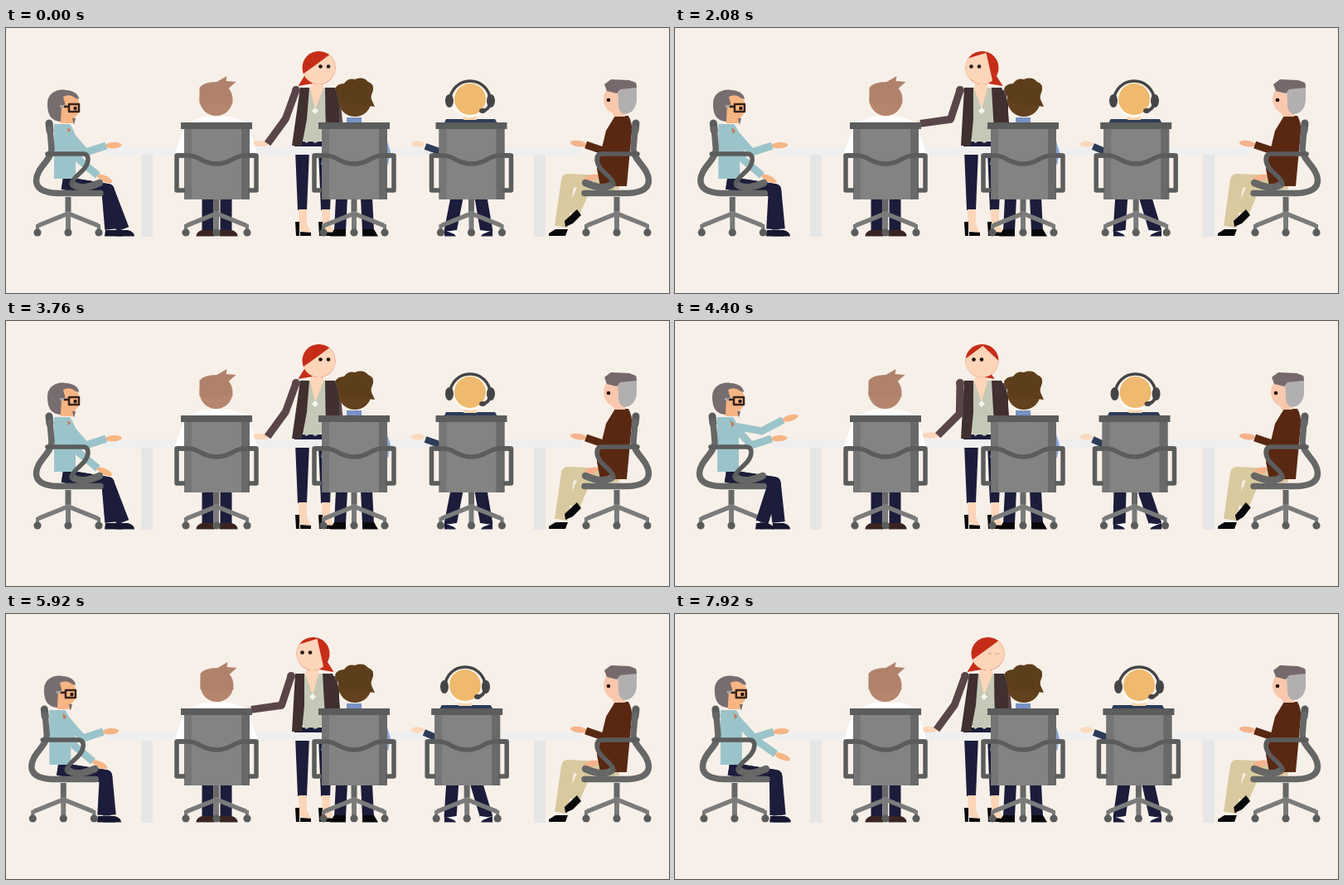
Recreate the animation shown at these times as an HTML page with a canvas. Size 800x320 px, loop 8000 ms.

```html
<!DOCTYPE html>
<html lang="en">
<head>
<meta charset="utf-8">
<title>Meeting</title>
<style>
html, body { margin: 0; width: 100%; height: 100%; overflow: hidden; background: #f7f0e9; }
canvas { display: block; }
</style>
</head>
<body>
<canvas id="stage" width="800" height="320"></canvas>
<script>
const ctx = document.getElementById('stage').getContext('2d');
const LOOP = 8000, CYCLE = 3840, STEP = 80, RAD = Math.PI / 180;
const NAVY = '#1c1d3b', BLACK = '#08080a', FRAME = '#666766', DARK = '#5b5c5c', BASE = '#7a7b7a';
const SKIN = '#fdd5b8', PEACH = '#f7b583', TEAL = '#9bc4ca', WOOL = '#592812', DENIM = '#2d3c58';

// Drawing helpers
function shape(color, d) { ctx.fillStyle = color; ctx.fill(new Path2D(d)); }
function rect(color, x, y, w, h) { ctx.fillStyle = color; ctx.fillRect(x, y, w, h); }
function oval(color, x, y, rx, ry = rx, degrees = 0) {
  ctx.fillStyle = color;
  ctx.beginPath();
  ctx.ellipse(x, y, rx, ry, degrees * RAD, 0, Math.PI * 2);
  ctx.fill();
}
function stroke(color, width, d, cap = 'butt') {
  Object.assign(ctx, { strokeStyle: color, lineWidth: width, lineCap: cap, lineJoin: 'round' });
  ctx.stroke(new Path2D(d));
}
function at(x, y, draw, flip = 1) {
  ctx.save();
  ctx.translate(x, y);
  ctx.scale(flip, 1);
  draw();
  ctx.restore();
}
function bothSides(x, draw) { for (const side of [-1, 1]) at(x, 0, draw, side); }

// Two bones and a hand, posed by the angles of the bones
function arm(sleeve, skin, x, y, upper, fore, upperAngle, foreAngle, handAngle = foreAngle) {
  const elbowX = x + upper * Math.cos(upperAngle * RAD), elbowY = y + upper * Math.sin(upperAngle * RAD);
  const wristX = elbowX + fore * Math.cos(foreAngle * RAD), wristY = elbowY + fore * Math.sin(foreAngle * RAD);
  oval(skin, wristX + 9 * Math.cos(handAngle * RAD), wristY + 9 * Math.sin(handAngle * RAD), 10, 3.7, handAngle);
  stroke(sleeve, 9, `M${x} ${y}L${elbowX} ${elbowY}L${wristX} ${wristY}`);
}

// Motion helpers
function ease(t, from, to) {
  const k = Math.min(1, Math.max(0, (t - from) / (to - from)));
  return k * k * (3 - 2 * k);
}
const hold = (t, from, full, release, end) => ease(t, from, full) - ease(t, release, end);

// Chairs
function wheels() {
  rect(FRAME, -3.5, 204, 7, 18);
  stroke(BASE, 5.5, 'M-36 238.5L0 224L36 238.5');
  stroke(BASE, 6, 'M0 221V244');
  for (const x of [-37, 0, 37]) {
    rect(BASE, x - 2, 237, 4, 8);
    oval(DARK, x, 247, 4.6);
  }
}
function sideChair() {
  stroke(DARK, 9, 'M52 115L53 124', 'round');
  stroke(FRAME, 7.5, 'M53 122L55 146C55 160 37 168 36.5 184C36.5 196 49 199 62 199.5H114', 'round');
  stroke(FRAME, 8.5, 'M81 189C90 195 101 192 113 187', 'round');
  stroke(DARK, 5.5, 'M50 152H93Q99 152 99 159C98 173 81 178 79 188', 'round');
}
function backChair(x) {
  at(x, 0, () => {
    wheels();
    rect('#828382', -39, 121, 79, 86);
    rect('#747574', -39, 121, 9, 86);
    rect('#686968', 30, 121, 10, 86);
    rect(DARK, -43, 114, 86, 8);
  });
  bothSides(x, () => {
    stroke(DARK, 5.5, 'M38 154H48V196H38');
    stroke(DARK, 5.5, 'M47 154H34C20 154 18 164 0 164');
  });
}

// People
function womanHead(turn, blink) {
  const RED = '#c62d18', right = Math.max(turn, 0);
  const eyes = -10 + 3 * turn + 9 * right;
  at(370.5 + 7 * right, 48, () => {
    at(6 - 6 * Math.abs(turn) - 16 * turn, 11, () => shape(RED, 'M-1 -5L9 11L-9 8Z'), turn > 0 ? -1 : 1);
    oval(RED, 0, 0, 20);
    ctx.fillStyle = SKIN;
    ctx.beginPath();
    ctx.moveTo(1 - 4 * turn, -18 + 14 * right);
    ctx.arc(0, 0, 20, -51 * turn * RAD, (187 - 28 * turn) * RAD);
    ctx.fill();
    for (const x of [eyes, eyes + 9.5]) {
      if (blink) stroke('#c9a08a', 1, `M${x - 2.5} 0H${x + 2.5}`);
      else oval('#17110f', x, -1.5, 2.3);
    }
  });
}

function woman(t) {
  const SLEEVE = '#5a4649', JACKET = '#40302f';
  const lean = 1 - hold(t, 240, 560, 2600, 3040);
  const turn = lean - hold(t, 560, 780, 2600, 3040);
  const reach = hold(t, 1520, 1960, 2200, 2600);
  const s = 6 * lean, half = s / 2;

  rect(NAVY, 348, 137, 36, 12);
  for (const x of [0, 28]) {
    at(x, 0, () => {
      shape(NAVY, 'M349 148H366L363 220H352Z');
      shape(SKIN, 'M353 219H363V236L368 248L354 244Z');
      shape(BLACK, 'M349 234H354V251H350ZM355 246L368 247V251H355Z');
    });
  }

  stroke(SLEEVE, 9, `M${395 + half} 75L${399 + half} 118`);
  shape('#c5c8b7', `M${358 + s} 72H${386 + half}L383 134L373 139L368 136L362 139L357 133Z`);
  shape(SKIN, `M${363 + s} 64H${377 + s}V73L${370 + half} 98L${361 + s} 73Z`);
  shape(JACKET, `M${349 + s} 72H${360 + s}L${360 + half} 110L357 142H345Z`);
  shape(JACKET, `M${382 + half} 72H${394 + half}L402 90V143H386Z`);
  at(370 + half, 100, () => shape('#f5f4ed', 'M0 -4L4 0L0 4L-4 0Z'));
  arm(SLEEVE, SKIN, 344 + s, 75, 37, 37,
    91 + 19 * lean + 17 * reach, 135 - 9 * lean + 37 * reach, 180);
  oval(SLEEVE, 344 + s, 75, 5);
  womanHead(turn, t >= 160 && t <= 320);
}

function leftMan(t) {
  const lean = hold(t, 0, 520, 1840, 2720);
  const step = hold(t, 0, 280, 2080, 2720);
  const tuck = hold(t, 240, 560, 1480, 2000);
  const lift = hold(t, 0, 560, 1480, 1960);
  const wave = hold(t, 160, 760, 1480, 1960);
  const GREY = '#776c6e', dx = -7 * lean;

  at(75 + dx, 0, wheels);
  for (const foot of [127 - 11 * lean - 11 * tuck, 141 - 16 * step]) {
    stroke(NAVY, 15.5, `M${68 + dx} 187L${123 - 3 * lean} 196L${foot} 243`);
    at(foot, 0, () => shape('#17182f', 'M-7 244H6Q14 246 14 251.5H-8Z'));
  }
  at(dx, 0, () => {
    shape(TEAL, 'M58 116H77Q83 124 84 134V182H58Z');
    shape('#c77a55', 'M74 120L78 123L79 130L76 132Z');
  });
  arm(TEAL, PEACH, 75 + dx * .6, 126, 32, 26, 49, -18, -3);
  arm(TEAL, PEACH, 78 + dx, 127, 34, 29, 72 - 62 * lift, 40 - 91 * wave, 25 - 55 * wave);

  at(-5 * lean, 0, () => {
    shape(PEACH, 'M62 99H85L82 115H66Z');
    oval(PEACH, 75, 95, 14, 16);
    shape(GREY, 'M66 113C53 112 50 103 50 91C50 78 63 73 72 75C81 75 88 80 88 86L76 82L70 84L75 91L67 94Z');
    shape(PEACH, 'M69 83Q77 79 83 84V91L72 94Z');
    shape(GREY, 'M80 109H84L82 117Z');
    rect('#aaa6a5', 65, 93, 9, 3);
    stroke('#38231a', 2.5, 'M70 95H76M76 92H88V101H76Z');
    oval('#26170f', 83.5, 97, 2.2);
  });
  at(dx, 0, sideChair);
}

function rightMan(t) {
  const PANTS = '#d9c99f', FACE = '#f9c8ae', HAND = '#f6b28b';
  const nod = -2 * hold(t, 240, 560, 560, 880);
  const tap = hold(t, 160, 500, 640, 860);

  at(-2 * hold(t, 2360, 2640, 3540, 3720), 0, () => {
    at(737, 0, wheels);
    stroke(PANTS, 16, 'M740 187L678 184L670 240');
    stroke(PANTS, 16, 'M735 188L700 187L684 224');
    shape(BLACK, 'M663 243H678L675 251H655V248Z');
    at(688, 220, () => {
      ctx.rotate(-tap * .13);
      shape(BLACK, 'M1 -1L6 6L-4 16L-13 20L-14 13Z');
    });
    oval(HAND, 706, 181, 9, 4, -15);
    shape(WOOL, 'M735 106H751Q756 114 755 126L749 191H717L713 170L724 124Z');
    arm(WOOL, HAND, 734, 120, 31, 24, 112, 199, 188);
    at(nod, 0, () => {
      shape(FACE, 'M728 96H747V107H734Z');
      oval(FACE, 738, 86, 17, 18);
      shape('#b2afb1', 'M738 72L761 67V88Q759 103 746 104Q738 101 739 90Z');
      shape('#77696b', 'M722 68L730 62L752 63L760 66L761 72L741 74L737 79L725 76Z');
      oval('#2a1714', 727, 87, 2.3);
    });
    at(812, 0, sideChair, -1);
  });
}

function quiffMan(t) {
  const SHOE = '#3a2421';
  shape('#fff', 'M238 107H270L291 113L303 151H204L216 116Z');
  bothSides(254.5, () => {
    rect(NAVY, 4, 205, 14, 40);
    shape(SHOE, 'M3 244H18Q25 246 25 251.5H3Z');
  });
  at(253.5 + hold(t, 560, 880, 2200, 2720), 86, () => {
    oval('#b5856d', 0, 0, 20);
    shape('#b0826b', 'M-20 5V-14Q-15 -21 1 -21L13 -28L12 -22L24 -21L15 -13Q19 -8 20 5Z');
  });
  backChair(254);
}

function brownHairMan() {
  shape('#87a2d2', 'M388 120H455L464 150L461 165H380Z');
  rect('#7892c4', 411, 108, 18, 8);
  bothSides(420, () => {
    shape(NAVY, 'M8 205H22L24 245H10Z');
    shape(BLACK, 'M10 243H24L29 251.5H10Z');
  });
  oval('#62411e', 421, 87, 20);
  shape('#5d3e1a', 'M397 73Q400 67 408 67Q413 60 421 62Q431 58 437 65Q444 67 443 75L440 84L445 95L437 94L404 91Z');
  backChair(420);
}

function headsetMan(t) {
  const BAND = '#454547';
  const dx = -5.3 * hold(t, 0, 560, 2480, 3120) - 1.7 * hold(t, 240, 560, 560, 880);
  const headX = -6 * hold(t, 240, 720, 2480, 3120);

  oval('#fbd9bd', 497 + dx * .1, 140, 8, 3.7);
  stroke(DENIM, 8, `M${526 + dx} 150L${506 + dx * .3} 143`);
  for (const side of [-1, 1]) {
    const hip = 558.5 + dx + side * 14.5, foot = 558 + side * 22;
    stroke(NAVY, 15, `M${hip} 205L${foot} 246`);
    at(foot, 0, () => {
      shape('#fff', 'M-8 244L7 246L-2 250H-8Z');
      shape(NAVY, 'M-7 251.5L-5 249L7 244V251.5Z');
    }, side);
  }
  at(561 + dx, 0, () => shape(DENIM, 'M-30 110H29L35 120H-35Z'));
  at(560 + headX, 0, () => {
    rect('#f7d7ae', -8, 102, 16, 9);
    oval('#fffaf1', 0, 87, 21);
    oval('#efba6f', 0, 86, 19);
    stroke(BAND, 3.5, 'M-24 87A24 23 0 0 1 24 87');
    stroke(BAND, 4, 'M24 92Q22 99 15 100', 'round');
    oval(BAND, 15, 100, 4, 3);
  });
  bothSides(560 + headX, () => oval(BAND, 25, 88, 5, 8));
  backChair(561.5 + dx);
}

function table() {
  rect('#efeff0', 119, 143, 575, 10);
  for (const x of [163, 637]) rect('#e6e6e6', x, 153, 14, 99);
}

function drawScene(now) {
  const t = Math.floor((now % LOOP) / STEP) * STEP % CYCLE;
  rect('#f7f0e9', 0, 0, 800, 320);
  woman(t);
  table();
  leftMan(t);
  rightMan(t);
  quiffMan(t);
  brownHairMan();
  headsetMan(t);
}

const start = performance.now();
function tick() {
  drawScene(performance.now() - start);
  requestAnimationFrame(tick);
}
tick();
</script>
</body>
</html>
```
